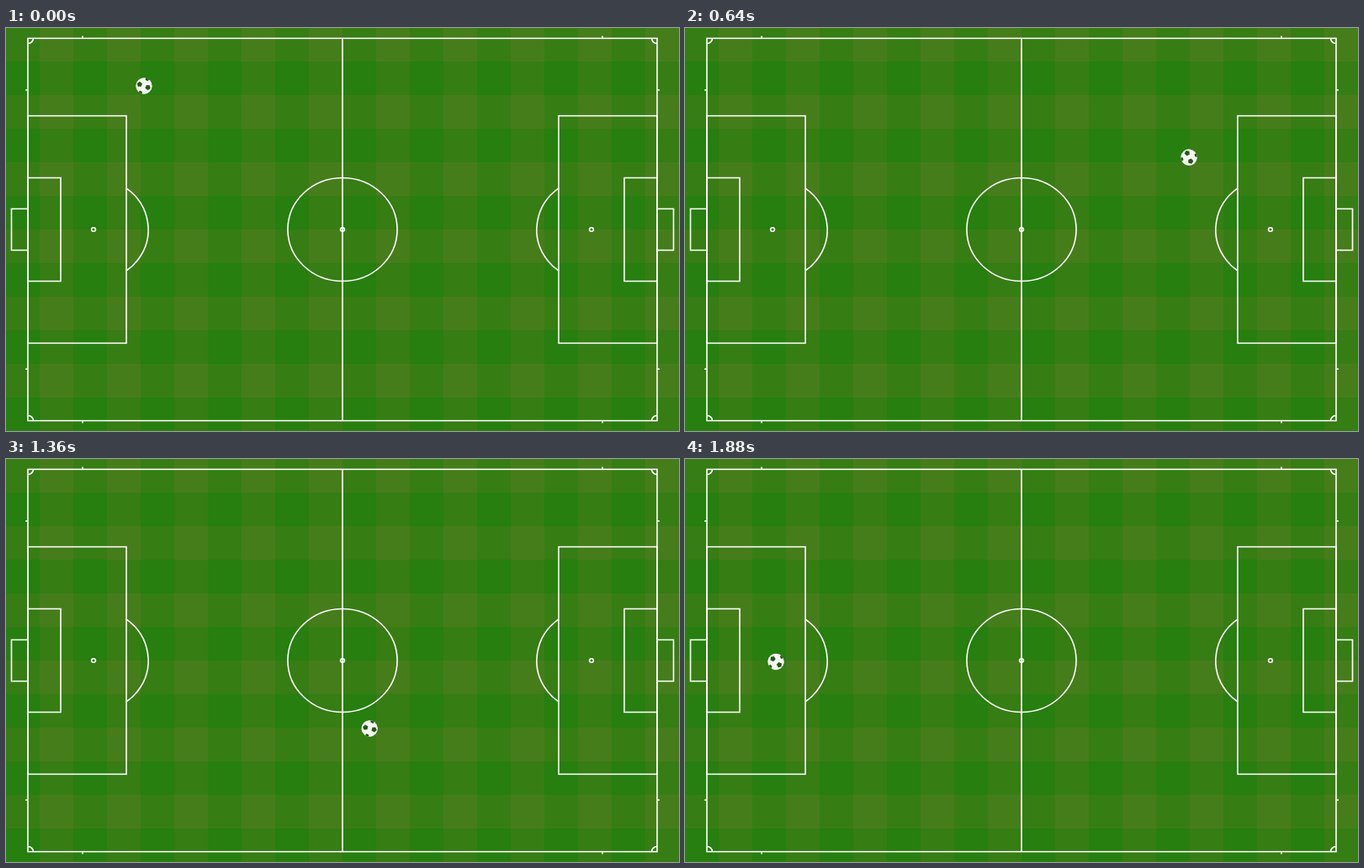
Recreate the animation shown at these times as an HTML page with a canvas. Size 800 by 480 pixels, loop 1.92 s.

```html
<!DOCTYPE html>
<html>
<head>
<meta charset="utf-8">
<title>Football pitch</title>
<style>
html, body { margin: 0; width: 800px; height: 480px; overflow: hidden; background: #267f0f; }
canvas { display: block; }
</style>
</head>
<body>
<canvas id="stage" width="800" height="480"></canvas>
<script>
const ctx = document.getElementById('stage').getContext('2d');
const LOOP = 1920, STEP = 40, TAU = Math.PI * 2;

// Two quadratic curves, half a loop each: start, control, end
const path = [
  [[164, 69], [718, 83.4], [589, 246]],
  [[589, 246], [449, 407], [77.5, 227]]
];

const pitch = document.createElement('canvas');
pitch.width = 800;
pitch.height = 480;
drawPitch(pitch.getContext('2d'));

function drawPitch(c) {
  const greens = ['#267f0f', '#367d14', '#467d1b'];
  for (let row = 0; row < 12; row++) {
    for (let col = 0; col < 20; col++) {
      c.fillStyle = greens[col % 2 + (row + 1) % 2];
      c.fillRect(col * 40, row * 40, 40, 40);
    }
  }

  // Units are yards; the field is 115 by 74 with a margin of 4 by 2
  c.scale(800 / 123, 480 / 78);
  c.translate(4, 2);
  c.strokeStyle = '#fff';
  c.lineWidth = 0.25;

  const line = (x1, y1, x2, y2) => {
    c.beginPath();
    c.moveTo(x1, y1);
    c.lineTo(x2, y2);
    c.stroke();
  };
  const arc = (x, y, r, from = 0, to = TAU) => {
    c.beginPath();
    c.arc(x, y, r, from, to);
    c.stroke();
  };

  c.strokeRect(0, 0, 115, 74);
  line(57.5, 0, 57.5, 74);
  arc(57.5, 37, 10);
  arc(57.5, 37, 0.37);

  const bend = Math.acos(0.6);
  for (const side of [0, 1]) {
    c.save();
    if (side) {
      c.translate(115, 0);
      c.scale(-1, 1);
    }
    c.strokeRect(0, 15, 18, 44);
    c.strokeRect(0, 27, 6, 20);
    c.strokeRect(-3, 33, 3, 8);
    arc(12, 37, 0.37);
    arc(12, 37, 10, -bend, bend);
    arc(0, 0, 1, 0, TAU / 4);
    arc(0, 74, 1, -TAU / 4, 0);
    line(10, -0.45, 10, 0);
    line(10, 74, 10, 74.45);
    line(-0.45, 10, 0, 10);
    line(-0.45, 64, 0, 64);
    c.restore();
  }
}

function patch(angle, dist, size) {
  const x = Math.cos(angle) * dist, y = Math.sin(angle) * dist;
  ctx.beginPath();
  for (let i = 0; i < 5; i++) {
    const a = angle + i * TAU / 5;
    ctx.lineTo(x + Math.cos(a) * size, y + Math.sin(a) * size);
  }
  ctx.fill();
}

function drawBall(x, y, heading) {
  ctx.save();
  ctx.translate(x, y);
  ctx.rotate(heading);
  ctx.beginPath();
  ctx.arc(0, 0, 9.7, 0, TAU);
  ctx.fillStyle = '#f4f8f0';
  ctx.fill();
  ctx.clip();
  ctx.fillStyle = '#27551a';
  patch(3.46, 5.5, 3.3);
  patch(0.33, 5, 3.3);
  patch(-1.15, 9.3, 2.6);
  patch(2.04, 9.3, 2.6);
  ctx.restore();
}

function frame(now) {
  const t = Math.floor((now - start) % LOOP / STEP) * STEP / LOOP * 2;
  const [a, b, c] = path[Math.floor(t)];
  const u = t % 1, v = 1 - u;
  const at = i => v * v * a[i] + 2 * u * v * b[i] + u * u * c[i];
  const speed = i => v * (b[i] - a[i]) + u * (c[i] - b[i]);

  ctx.drawImage(pitch, 0, 0);
  drawBall(at(0), at(1), Math.atan2(speed(1), speed(0)));
}

const start = performance.now();
function tick() {
  frame(performance.now());
  requestAnimationFrame(tick);
}
tick();
</script>
</body>
</html>
```
